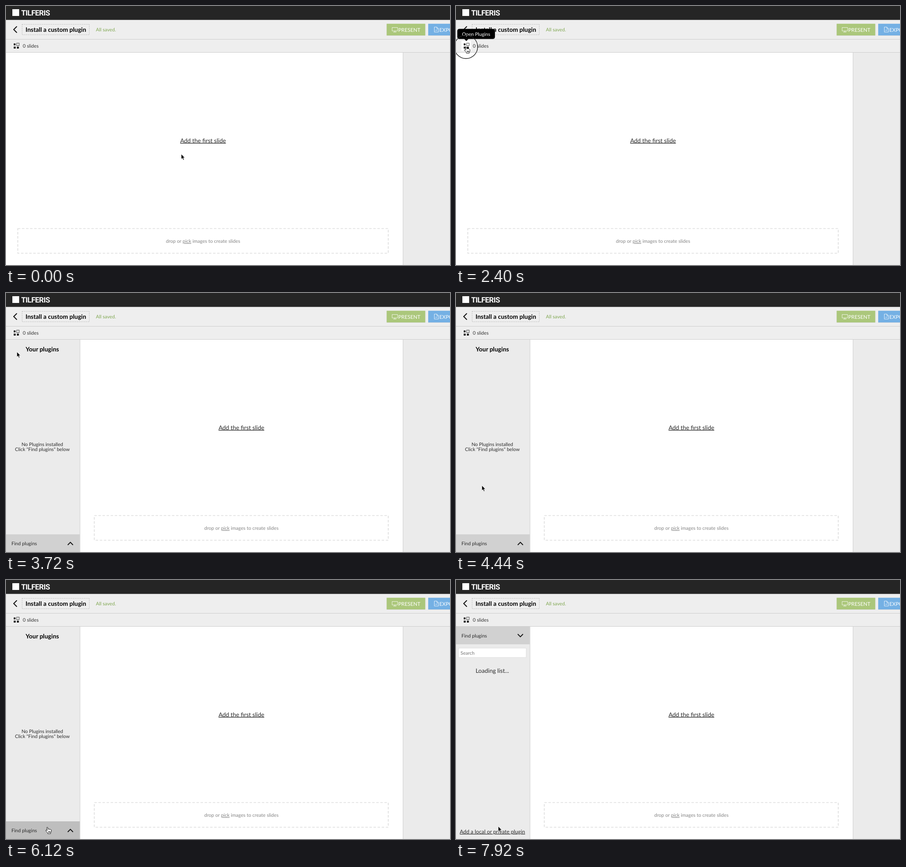
An HTML page that plays this animation: 978 px wide and 572 px high, repeating every 8000 ms.

```html
<!DOCTYPE html>
<html lang="en">
<head>
<meta charset="utf-8">
<title>Install a custom plugin</title>
<style>
  html, body { margin: 0; width: 100%; height: 100%; overflow: hidden; background: #fff; }
  svg { display: block; font-family: Lato, "Open Sans", sans-serif; font-size: 10.65px; fill: #2b2b2b; text-rendering: geometricPrecision; }
  .big { font-size: 13.06px; }
  .bold { font-size: 13.5px; font-weight: 700; fill: #000; }
  .mid { text-anchor: middle; }
  .link { text-decoration: underline; }
  .btn { font-size: 11.4px; fill: #fff; }
  .line { fill: none; stroke: #111; stroke-width: 1.8; }
  .thin { fill: none; stroke: #fff; stroke-width: .8; }
  .edge { fill: #cdcdcd; }
</style>
</head>
<body>
<svg width="978" height="572" viewBox="0 0 978 572" xmlns="http://www.w3.org/2000/svg">
  <rect width="978" height="572" fill="#fff"/>

  <!-- canvas -->
  <text id="add" class="big mid link" y="301.5">Add the first slide</text>
  <rect id="drop" y="491.5" height="54.5" fill="none" stroke="#dedede" stroke-width="1.7" stroke-dasharray="5.5 3.5"/>
  <text id="dropText" class="mid" y="523" fill="#858585">drop or <tspan class="link">pick</tspan> images to create slides</text>

  <!-- right panel -->
  <rect x="874" y="103" width="104" height="469" fill="#ebebeb"/>
  <rect class="edge" x="874" y="103" width="1" height="469"/>

  <!-- left panel -->
  <g id="panel">
    <rect y="103" width="163" height="469" fill="#ebebeb"/>
    <rect class="edge" x="162.5" y="103" width="1" height="469"/>
    <g id="installed">
      <text class="bold mid" x="80" y="128.5">Your plugins</text>
      <g id="empty">
        <text class="mid" x="80" y="337.5">No Plugins installed</text>
        <text class="mid" x="80" y="349.3">Click "Find plugins" below</text>
      </g>
    </g>
    <g id="finder">
      <rect x="5.5" y="150.5" width="149" height="20.5" fill="#fff" stroke="#e0e0e0"/>
      <text x="10" y="164.7" fill="#757575" font-size="10.5">Search</text>
      <text class="big mid" x="80" y="204.5">Loading list...</text>
      <text class="mid link" x="80.2" y="559.7" font-size="11.8">Add a local or private plugin</text>
    </g>
    <g id="bar">
      <rect id="barFill" width="162.5" height="39"/>
      <text id="barText" x="12" y="23.5">Find plugins</text>
      <path id="caret" class="line"/>
    </g>
  </g>

  <!-- header and toolbars -->
  <rect y="30" width="978" height="73" fill="#eee"/>
  <rect width="978" height="30.7" fill="#252525"/>
  <rect x="14" y="7" width="15" height="15" fill="#fff"/>
  <text x="33.5" y="20.5" font-family="Roboto, sans-serif" font-weight="700" font-size="16.5" letter-spacing="-.6" fill="#fff">TILFERIS</text>
  <rect class="edge" y="73" width="978" height="1"/>
  <rect class="edge" y="102" width="978" height="1"/>
  <path class="line" d="M24 45L17 52L24 59" style="stroke-width:2"/>
  <rect x="35.5" y="40.5" width="148" height="23" fill="none" stroke="#b5b5b5" stroke-dasharray="2 2"/>
  <text class="bold" x="43" y="56.7">Install a custom plugin</text>
  <text x="198" y="56" fill="#82a954">All saved.</text>
  <rect x="838.5" y="40" width="85" height="25.7" fill="#d8d8d8"/>
  <rect x="838.5" y="39.2" width="85" height="25.8" fill="#abc77b"/>
  <path class="thin" d="M850.5 47.5h12v7.5h-12zM856.5 55v2.5M853 57.5h7"/>
  <text class="btn" x="864" y="56.5">PRESENT</text>
  <rect x="930" y="40" width="48" height="25.7" fill="#d8d8d8"/>
  <rect x="930" y="39.2" width="48" height="25.8" fill="#74b0e4"/>
  <path class="thin" d="M943.5 46.5h5.5l3.5 3.5v7.5h-9zM949 46.5v3.5h3.5M945.5 55l2-2 1.5 1 1.5-1.5"/>
  <text class="btn" x="954.5" y="56.5">EXPORT</text>

  <rect id="iconHover" x="12" y="77" width="21" height="22" fill="#fff"/>
  <path d="M17 82.7h4v4h-4zM17 89.7h4.3v4.3h-4.3zM24 89.7h4.3v4.3h-4.3z" fill="#111"/>
  <rect x="23.5" y="82" width="5.5" height="5.5" fill="none" stroke="#333" stroke-width=".9"/>
  <text x="37" y="91.7" fill="#333">0 slides</text>

  <g id="tip">
    <rect x="2.8" y="50.5" width="83" height="22.3" rx="4.5" fill="#000"/>
    <path d="M18 72.5h9.5l-4.7 5z" fill="#000"/>
    <text class="mid" x="44.3" y="65.5" fill="#fff">Open Plugins</text>
  </g>

  <circle id="ring" r="25.7" fill="none" stroke="#222" stroke-width="1.3"/>
  <g id="cursor">
    <path id="arrow" d="M0 0V11.3L2.5 9L4.4 13.2L6.3 12.4L4.5 8.2H7.8Z" fill="#000" stroke="#fff" stroke-width=".8"/>
    <path id="hand" d="M-1.2 .6Q-.2 -.8 .9 .6L2.2 4.6L3.6 4.1L5 4.6L6.3 4.4L7.4 5.4Q8.9 5.2 8.9 6.8L8.6 10.2L7.2 12.4V14.2H.9V12.7L-2.2 9.2Q-4.4 7 -3 6.2Q-1.8 6 -.2 7.4ZM2.6 9v3M4.4 9v3M6.1 9v3" fill="#fff" stroke="#111" stroke-width="1" stroke-linejoin="round"/>
  </g>
</svg>
<script>
const LOOP = 8000, STEP = 120;
const OPEN = 2520, SEARCH = 7200;
const $ = id => document.getElementById(id);
const show = (id, on) => $(id).style.display = on ? "" : "none";
const set = (id, attrs) => {
  for (const name in attrs) $(id).setAttribute(name, attrs[name]);
};
const move = (id, x, y) => set(id, { transform: `translate(${x} ${y})` });

// time, x, y of the pointer
const path = [
  [0, 386, 327], [360, 386, 327], [480, 370, 316], [600, 322, 285], [720, 245, 235],
  [840, 160, 180], [960, 88, 133], [1080, 42, 103], [1200, 23, 91], [1320, 22, 90],
  [3600, 22, 90], [3840, 26, 170], [4080, 38, 290], [4440, 57, 425], [4800, 73, 495],
  [5280, 86, 541], [5400, 87.5, 543], [5880, 91, 546],
  [7680, 91, 546], [7920, 93, 544], [LOOP, 93, 544]
];

function pointer(t) {
  const i = path.findIndex(p => p[0] > t);
  const [t0, x0, y0] = path[i - 1], [t1, x1, y1] = path[i];
  const k = (t - t0) / (t1 - t0);
  return [x0 + (x1 - x0) * k, y0 + (y1 - y0) * k];
}

function draw(time) {
  const t = Math.floor(time / STEP) * STEP;
  const [x, y] = pointer(t);
  const open = t >= OPEN, searching = t >= SEARCH;
  const settling = open && t < OPEN + STEP;
  const onIcon = x > 12 && x < 33 && y > 77 && y < 99;
  const onBar = open && !searching && x < 163 && y > 533;
  const hand = onIcon || onBar || (searching && t < 7800);

  // canvas shrinks when the panel opens
  const left = open ? 194.5 : 26, center = open ? 518.5 : 434;
  set("add", { x: center });
  set("dropText", { x: center });
  set("drop", { x: left, width: 842 - left });

  show("panel", open);
  show("installed", !searching);
  show("finder", searching);
  move("empty", 0, settling ? 1.2 : 0);
  move("bar", 0, searching ? 103 : settling ? 535 : 533);
  set("barFill", { fill: onBar ? "#bebebe" : "#d1d1d1" });
  show("caret", !settling);
  set("caret", { d: searching ? "M136 16.5L141.8 22.5L147.6 16.5" : "M136 23.5L141.8 17.5L147.6 23.5" });

  show("iconHover", onIcon);
  show("tip", onIcon);
  set("tip", { opacity: t < 1320 ? 0.6 : 1 });

  const pressed = (t >= 2280 && t < OPEN) || (t >= 6960 && t < SEARCH);
  show("ring", pressed);
  move("ring", x, y + 0.3);
  move("cursor", x, y);
  show("arrow", !hand);
  show("hand", hand);
}

const start = performance.now();
function tick() {
  draw((performance.now() - start) % LOOP);
  requestAnimationFrame(tick);
}
tick();
</script>
</body>
</html>
```
